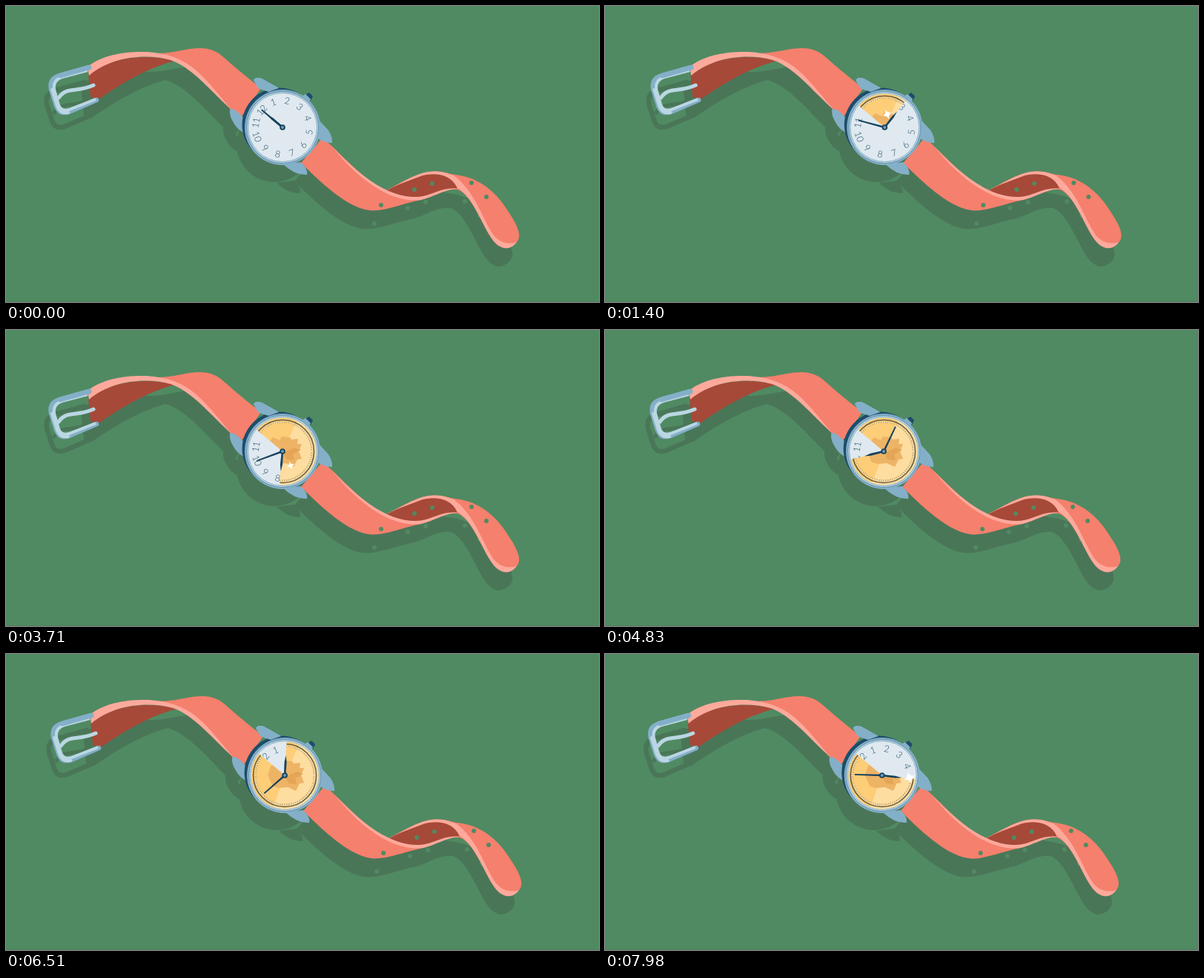
An HTML page for the animation above (8000 ms loop, 800 px wide and 400 px high).

```html
<!DOCTYPE html>
<html lang="en">
<head>
<meta charset="utf-8">
<title>Wristwatch</title>
<style>
  html, body { margin: 0; width: 100%; height: 100%; overflow: hidden; background: #508a62; }
  svg { display: block; width: 100vw; height: 100vh; }
  text { font: 300 12.5px Lato, "Open Sans", sans-serif; fill: #1f4a63; text-anchor: middle; }
</style>
</head>
<body>
<svg viewBox="0 0 800 400">
  <defs>
    <path id="strapA" d="M110 82C130 66 160 61 203 64C230 63 240 57 262 57C275 57 284 61 292 68C310 84 326 97 344 111L318 149L302 139C275 112 250 82 224 75C198 82 168 96 125 126L114 123Z"/>
    <path id="strapB" d="M427 178C455 202 478 232 513 249C535 238 555 224 577 223.500C590 223 598 227 606 228C634 231 655 246 671 268C684 287 694 302 692 313C690 321 682 327 672 327C663 325 657 318 650 306C636 280 625 254 609 248C590 246 580 256 560 262C535 267 514 276.500 494 276.500C465 275 432 246 398 212Z"/>
    <path id="frame" d="M112 83L73 94Q58 98 61 113L68 135Q72 147 85 143L122 127" fill="none" stroke-linecap="round" stroke-width="6.500"/>
    <path id="prong" d="M71 124C82 108 94 118 118 107" fill="none" stroke-linecap="round" stroke-width="5"/>
    <g id="lugs">
      <path d="M334 100Q337 95 345 98L370 112L358 118L340 111Z"/>
      <path d="M302 140Q304 137 311 142L324 154L323 172Q312 168 306 156Q301 148 302 140Z"/>
      <path d="M422 154L435 168Q441 178 440 185Q430 186 418 177Z"/>
      <path d="M374 214L398 211Q408 221 406 228Q390 229 374 214Z"/>
    </g>
    <clipPath id="wedge"><path id="wedgePath"/></clipPath>
  </defs>

  <rect width="800" height="400" fill="#508a62"/>
  <rect y="399" width="800" height="1" fill="#4a7e5b"/>

  <g id="watch">
    <g fill="#4a7658">
      <g transform="translate(-9 25)">
        <use href="#strapA"/>
        <use href="#strapB"/>
        <use href="#lugs"/>
        <circle cx="371" cy="162" r="51"/>
        <g class="holes"></g>
      </g>
      <g transform="translate(-6 20)" stroke="#4a7658">
        <use href="#frame"/>
        <use href="#prong"/>
      </g>
    </g>

    <!-- buckle strap -->
    <path fill="#a64938" d="M111 93C140 70 185 63 228 74C198 82 168 96 125 126L114 123Z"/>
    <path fill="#f5806d" d="M198 64C230 64 240 57 262 57C275 57 284 61 292 68C310 84 326 97 344 111L318 149L302 139C278 108 250 78 225 71Z"/>
    <path fill="#fda99c" d="M110 82C130 66 160 61 190 62C222 64 244 74 263 93C280 110 292 126 304 140C280 120 252 83 222 73C185 63 140 70 112 94Z"/>

    <!-- buckle -->
    <use href="#frame" stroke="#84afc8"/>
    <path d="M110 87L76 96Q63 100 65 113L71 134Q75 143 85 140L121 126" fill="none" stroke="#bad7e3" stroke-width="4"/>
    <path d="M112 83L73 94" stroke="#84afc8" stroke-width="6.500" stroke-linecap="round"/>
    <path d="M84 144Q73 146 69 135L62 113" fill="none" stroke="#bad7e3" stroke-width="4" stroke-linecap="round"/>
    <use href="#prong" stroke="#bad7e3"/>

    <!-- holed strap -->
    <use href="#strapB" fill="#f5806d"/>
    <path fill="#a64938" d="M512 250C535 239 555 227 577 227C592 226 603 231 609 247C590 245 578 258 556 259C540 260 525 255 512 250Z"/>
    <path fill="#fda99c" d="M440 190C470 222 510 258 552 258C575 258 585 244 610 247C590 248 580 257 560 262C515 268 468 226 440 190Z"/>
    <path fill="#fda99c" d="M525 243C545 233 558 224 577 223.500C590 223 598 227 604 229C632 250 640 282 656 307C664 319 676 323 689 319C684 326 678 328 672 327C663 325 657 318 650 306C636 280 625 254 609 246C600 227 580 225 562 229Z"/>
    <g class="holes"></g>

    <!-- case -->
    <path d="M404 120L409 117L414 122L411 128Z" fill="#1e4d6b"/>
    <path d="M399 122L404 119L411 126L408 130Z" fill="#84afc8"/>
    <use href="#lugs" fill="#84afc8"/>
    <circle cx="368.500" cy="160.500" r="50" fill="#1e4d6b"/>
    <path d="M334 100Q337 95 345 98L368 111L354 116L340 111Z" fill="#84afc8"/>
    <g transform="translate(373 164)">
      <circle r="51" fill="#84afc8"/>
      <circle r="48.500" fill="#c4dbe6" stroke="#4f809f" stroke-width=".8"/>
      <circle r="46.500" fill="#dfe9ef" stroke="#6d9dba" stroke-width=".8"/>
      <g id="numerals"></g>
      <g clip-path="url(#wedge)">
        <circle r="45.500" fill="#fdcd77"/>
        <path id="light" fill="#fedda0"/>
        <circle r="42.500" fill="none" stroke="#665d42" stroke-width="1.600"/>
        <circle r="39.500" fill="none" stroke="#c39f5a" stroke-width="1.600"/>
        <circle r="39.500" fill="none" stroke="#fff3d4" stroke-width="1.600" stroke-dasharray="1.400 1.600"/>
        <g transform="translate(1 2)">
          <path fill="#edb466" d="M-14-21L-5-17L-2-22L9-21L11-18L20-19L19-12L25-12L21-2L25 8L19 9L14 19L3 14L-9 15L-17 13L-21 5L-24-3L-20-14Z"/>
          <path fill="#e4a656" d="M0 0L15-7L24-4L13 2L15 10L4 9Z"/>
        </g>
      </g>
      <path id="minute" fill="#17425e" d="M-1.300 0L-.9-37H.9L1.300 0Z"/>
      <path id="hour" fill="#17425e" d="M-1.200 0L-1.500-18L0-27L1.500-18L1.200 0Z"/>
      <circle r="3.800" fill="#17425e"/>
      <circle r="2" fill="#6d9dba"/>
      <path id="spark" fill="#fff" d="M0-7Q1-1 7 0Q1 1 0 7Q-1 1-7 0Q-1-1 0-7Z"/>
    </g>
  </g>
</svg>
<script>
const LOOP = 8000, STEP = 70, TILT = -50, SWAY = 3720;
const $ = id => document.getElementById(id);

// Dial angles run clockwise from straight up.
const polar = (deg, r) => {
  const a = deg * Math.PI / 180;
  return [r * Math.sin(a), -r * Math.cos(a)];
};

function sector(from, to, r) {
  const span = to - from;
  if (span <= 0) return 'M0 0';
  return `M0 0L${polar(from, r)}A${r} ${r} 0 ${span > 180 ? 1 : 0} 1 ${polar(to, r)}Z`;
}

const holes = [[506, 269], [551, 248], [575, 240], [628, 239], [648, 258]];
document.querySelectorAll('.holes').forEach(g => {
  g.innerHTML = holes.map(([x, y]) => `<circle cx="${x}" cy="${y}" r="3" fill="#508a62"/>`).join('');
});

// Lower numerals are flipped so they read from below.
let marks = '';
for (let n = 1; n <= 12; n++) {
  const a = (n * 30 + TILT + 360) % 360;
  const [x, y] = polar(a, 36.5);
  const turn = a > 95 && a < 265 ? a + 180 : a;
  marks += `<text y="4.5" transform="translate(${x} ${y}) rotate(${turn})">${n}</text>`;
}
$('numerals').innerHTML = marks;
$('light').setAttribute('d', sector(25, 200, 45.5));
const twelve = $('numerals').lastElementChild;

// time, angle, radius, size
const sparks = [[1400, 11, 18, 1], [2450, 72, 36, .7], [3710, 150, 22, .8], [7980, 95, 37, 1.2]];

function draw(t) {
  const dx = 2.7 * (1 - Math.cos(2 * Math.PI * (t - 90) / SWAY));
  $('watch').setAttribute('transform', `translate(${dx} 0)`);

  const hours = Math.max(0, t * .002122 - .04);
  const hourDeg = hours % 12 * 30 + TILT;
  $('hour').setAttribute('transform', `rotate(${hourDeg})`);
  $('minute').setAttribute('transform', `rotate(${hours * 360 + TILT})`);

  // The gold dial fills behind the hour hand, then is wiped away.
  const filling = hours < 12;
  $('wedgePath').setAttribute('d', filling ? sector(TILT, hourDeg, 47) : sector(hourDeg, TILT + 360, 47));
  twelve.setAttribute('visibility', filling && hours > .5 ? 'hidden' : 'visible');

  const s = sparks.find(k => Math.abs(t - k[0]) < 220);
  const size = s ? s[3] * (1 - Math.abs(t - s[0]) / 220) : 0;
  $('spark').setAttribute('transform', s ? `translate(${polar(s[1], s[2])}) rotate(-20) scale(${size})` : 'scale(0)');
}

const start = performance.now();
function tick() {
  const t = (performance.now() - start) % LOOP;
  draw(Math.floor(t / STEP) * STEP);
  requestAnimationFrame(tick);
}
draw(0);
requestAnimationFrame(tick);
</script>
</body>
</html>
```
